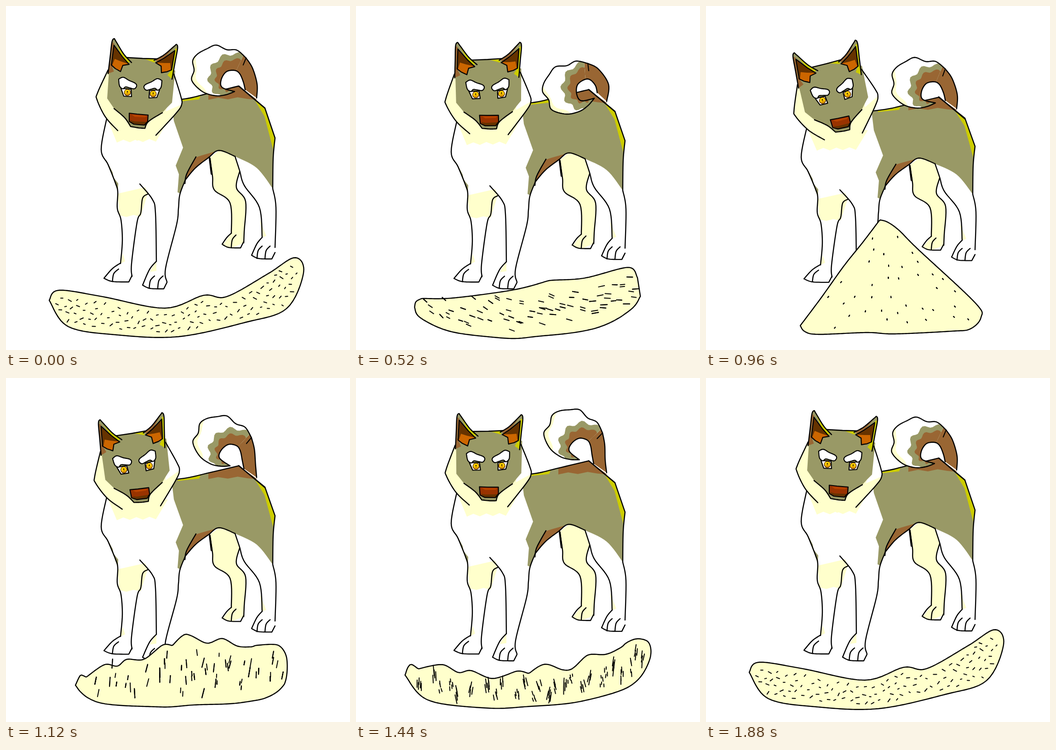
Write an HTML page with a canvas that moves like this. It is 748 px wide and 748 px high and loops after 1.92 s.

```html
<!DOCTYPE html>
<html lang="en">
<head>
<meta charset="utf-8">
<title>Dog</title>
<style>
html, body { margin: 0; width: 100%; height: 100%; overflow: hidden; background: #fff; }
canvas { display: block; width: 748px; height: 748px; }
</style>
</head>
<body>
<canvas id="stage" width="748" height="748"></canvas>
<script>
const ctx = document.getElementById('stage').getContext('2d');
const LOOP = 1920, STEP = 40, RAD = Math.PI / 180;
const OLIVE = '#999966', BROWN = '#996633', CREAM = '#ffffcc', LIME = '#cccc00',
  DARK = '#663300', ORANGE = '#cc6600', RUST = '#993300', GOLD = '#ffcc00', WHITE = '#fff';

const mix = (a, b, k) => a + (b - a) * k;
const clamp = (v, lo = 0, hi = 1) => Math.min(hi, Math.max(lo, v));
const mixPt = (p, q, k) => p.map((v, i) => mix(v, q[i], k));
const mixPts = (a, b, k) => a.map((p, i) => mixPt(p, b[i], k));
const pts = s => s.trim().split(/\s+/).map(p => p.split(',').map(Number));

// Smooth line through the given points.
function spline(r) {
  if (r.length < 3) return r;
  const out = [r[0]];
  for (let i = 0; i < r.length - 1; i++) {
    const a = r[i - 1] || r[i], b = r[i], c = r[i + 1], d = r[i + 2] || c;
    for (let n = 1; n <= 8; n++) {
      const u = n / 8;
      out.push([0, 1].map(j => b[j] + u * (c[j] - a[j]) / 2
        + u * u * (a[j] - 2.5 * b[j] + 2 * c[j] - d[j] / 2)
        + u * u * u * (1.5 * (b[j] - c[j]) + (d[j] - a[j]) / 2)));
    }
  }
  return out;
}

// A slash in the string marks a sharp corner.
function curve(s) {
  let last = null;
  return s.split('/').flatMap(part => {
    const run = pts(part);
    if (last) run.unshift(last);
    last = run[run.length - 1];
    return spline(run);
  });
}

// Zigzag fur edge between two points.
const fur = (a, b, n, depth) => Array.from({ length: n + 1 }, (_, i) => {
  const [x, y] = mixPt(a, b, i / n);
  return [x, y + (i % 2 ? -depth : depth)];
});

function trace(p, closed) {
  ctx.beginPath();
  p.forEach(([x, y]) => ctx.lineTo(x, y));
  if (closed) ctx.closePath();
}
function fill(p, color) { trace(p, true); ctx.fillStyle = color; ctx.fill(); }
function ink(p, w = 2.4, closed = false) { trace(p, closed); ctx.lineWidth = w; ctx.stroke(); }
function disc(x, y, r, color) {
  ctx.beginPath();
  ctx.arc(x, y, r, 0, 7);
  ctx.fillStyle = color;
  ctx.fill();
}

// ---- body ----
const back = curve('360,206 400,200 440,190 506,174 / 563,222 / 585,287 / 581,330 580,397');
const rump = back.slice(-11, -9);
const chest = curve('220,240 207,312 222,345 238,385 243,404 242,440 250,465 253,510 249,560');
const foreInner = curve('274,588 273,560 285,470 293,450 297,418 308,409');
const foreNear = curve('291,387 318,420 325,450 327,555');
const foreBack = curve('350,600 347,570 371,475 375,440 378,410 390,378');
const belly = curve('390,378 412,352 440,330 463,314 498,327');
const hindFront = curve('498,327 508,358 518,390 551,438 557,503');
const hindBack = curve('580,397 587,438 585,525');
const farBack = curve('443,330 449,370 453,400 487,428 490,494');
const farFront = curve('517,515 518,490 521,425 501,395 508,360');
const elbow = curve('413,328 393,365 389,386');
const haunch = curve('498,327 545,352 580,397');
const flank = pts('373,405 376,366 369,347 385,308 365,250');

const patches = [
  [CREAM, [...farBack, [470, 521], [491, 526], ...farFront, ...belly.slice(-9).reverse()]],
  [OLIVE, [...flank, ...back, ...haunch.slice().reverse(), ...belly.slice().reverse(), [379, 408]]],
  [BROWN, [[440, 191], [506, 174], [546, 204], ...fur([525, 200], [440, 202], 4, 2)]],
  [LIME, pts('374,204 400,200 424,193 420,203 374,208')],
  [LIME, pts('540,203 563,222 585,287 582,316 562,240')],
  [BROWN, [...belly.slice(0, -8), ...pts('425,325 413,329 393,365')]],
  [OLIVE, pts('217,333 232,362 234,373 244,386 243,404 236,383')],
  [CREAM, [[218, 240], ...fur([241, 294], [326, 292], 6, 3), [352, 250]]],
  [CREAM, [[243, 408], [303, 394], [308, 408], ...fur([293, 456], [246, 457], 3, 2)]],
  [CREAM, pts('254,538 259,555 249,560')],
  [CREAM, pts('327,555 327,576 312,578')],
  [CREAM, pts('552,465 566,500 557,503')]
];
const lines = [back, chest, foreInner, foreNear, foreBack, belly, hindFront, hindBack, farBack, farFront, elbow];

function paw(x, y, left, base, right, toes) {
  const w = right - left;
  ink([...spline([[x, y], [mix(x, left, .5), mix(y, base, .3)], [left, base - 8]]),
    ...spline([[left, base - 8], [left + w * .3, base - 1], [right - 7, base]]), [right, base - 14]]);
  toes.forEach(k => ink(spline([[left + w * (k + .22), base - 28], [left + w * (k + .05), base - 18], [left + w * k, base - 1]])));
}

function drawBody() {
  patches.forEach(([color, p]) => fill(p, color));
  lines.forEach(p => ink(p));
  ink([[443, 332], [447, 365]], 4);
  paw(249, 559, 213, 600, 274, [.3]);
  paw(327, 555, 297, 615, 350, [.27, .62]);
  paw(557, 503, 534, 550, 585, [.23, .57]);
  paw(490, 494, 470, 526, 517, [.42]);
}

// ---- tail: the curl turns about a joint, the stem follows part of the way ----
const JOINT = [525, 135], HOLE = [490, 163];
const tailEdge = pts('545,200 546,170 536,135 522,113 502,96 480,95 457,85 437,93 417,104 406,119 409,140 404,162 427,186 455,195 478,193 497,186 470,177 468,160 479,143 497,140 508,147 516,165 520,182');
const CORNER = 3, TIP = 15, STEM = 19;

// Wavy arc around the hole, from the corner round to the tip.
function band(r0, r1, ripple) {
  const arc = Array.from({ length: 41 }, (_, i) => {
    const u = i / 40, a = mix(-65, -285, u) * RAD, r = mix(r0, r1, u) + ripple * Math.sin(u * 40);
    return [HOLE[0] + r * Math.cos(a), HOLE[1] + r * Math.sin(a)];
  });
  return [...arc, HOLE];
}
const bands = [[CREAM, band(130, 130, 0)], [WHITE, band(135, 15, 3)], [OLIVE, band(62, 36, 4)], [BROWN, band(50, 18, 3)]];

function drawTail(curl) {
  const turn = -39 * RAD * curl, sway = -10 * curl, c = Math.cos(turn), s = Math.sin(turn);
  const edge = tailEdge.map((p, i) => {
    const x = p[0] - JOINT[0], y = p[1] - JOINT[1];
    const bent = [JOINT[0] + sway + x * c - y * s, JOINT[1] + x * s + y * c];
    return mixPt(p, bent, i < CORNER || i > STEM ? clamp((200 - p[1]) / 65) : 1);
  });
  const outline = [...spline(edge.slice(0, CORNER + 1)), ...spline(edge.slice(CORNER, TIP + 1)), ...spline(edge.slice(TIP))];
  ctx.save();
  trace(outline, true);
  ctx.clip();
  fill(outline, BROWN);
  ctx.translate(JOINT[0] + sway, JOINT[1]);
  ctx.rotate(turn);
  ctx.translate(-JOINT[0], -JOINT[1]);
  bands.forEach(([color, p]) => fill(p, color));
  ctx.restore();
  ink(outline);
  ink([edge[CORNER], mixPt(edge[CORNER], edge[STEM + 1], .45)], 2);
  ink([[506, 174], [563, 222]]);
}

// ---- head ----
const maneLeft = curve('222,138 199,188 198,203 216,240 243,270');
const maneRight = curve('365,147 380,195 382,213 370,232 326,280');
const jaw = curve('235,222 258,242 271,261 / 288,264 302,265 / 310,250 340,231');
const face = [[224, 140], [220, 200], ...jaw, ...pts('350,220 361,209 368,140 330,114 297,112 262,112')];
const nose = pts('268,232 285,234 309,236 308,250 301,258 278,256 268,250');
const brow = spline(pts('-19,-9 -9,-13 4,-6 17,0 20,6 15,12 5,10 -4,8 -10,12 -17,6 -19,-9'));
const lid = pts('-14,-9 8,-7 9,9 -8,8');

// Ear shapes in fractions of the way from the outer foot to the inner foot and to the tip.
const earShape = spline(pts('0,0 0,.5 0,.93 .08,1 .17,.9 .6,.38 1,0'));
const earOuter = pts('0,0 0,.5 0,.93 .11,.85 .06,.3 .25,-.02');
const earInner = pts('.15,.92 .6,.38 .95,.06 .85,.04 .5,.38');
const earHollow = pts('.11,.8 .55,.32 .9,-.02 .62,.04 .55,-.12 .42,-.03 .3,.05 .1,.22');
const earGlow = pts('.22,.36 .5,.2 .88,0 .62,.04 .55,-.11 .42,-.03 .3,.05 .14,.2');

function ear(foot, inner, tip, outerColor, innerColor) {
  const fit = p => p.map(([u, v]) => foot.map((f, j) => f + u * (inner[j] - f) + v * (tip[j] - f)));
  fill(fit(earShape), OLIVE);
  fill(fit(earOuter), outerColor);
  fill(fit(earInner), innerColor);
  fill(fit(earHollow), DARK);
  fill(fit(earGlow), ORANGE);
  ink(fit(earHollow), 2.2, true);
  ink(fit(earShape));
}

function eye(x, y, side) {
  const at = (p, dy) => p.map(([a, b]) => [x + side * a, y + b + dy]);
  ctx.save();
  fill(at(lid, 0), WHITE);
  trace(at(lid, 0), true);
  ctx.clip();
  disc(x, y, 7.5, DARK);
  disc(x, y - .5, 6, GOLD);
  disc(x, y + 3, 3, '#dd9900');
  disc(x, y - 1.5, 1.3, '#000');
  ctx.restore();
  ink(at(lid, 0), 2.2, true);
  fill(at(brow, -20), WHITE);
  ink(at(brow, -20), 2.2, true);
}

function drawHead(lean) {
  ctx.save();
  ctx.translate(288 + 5.2 * lean, 245 + 8.3 * lean);
  ctx.rotate(-17.7 * lean * RAD);
  ctx.translate(-288, -244);
  fill([...maneLeft, [285, 292], ...maneRight.slice().reverse()], CREAM);
  fill([...maneRight.slice(0, 17), [348, 228]], WHITE);
  fill(face, OLIVE);
  fill(pts('297,112 330,114 322,122'), LIME);
  [maneLeft, maneRight, jaw, [[262, 111], [297, 113], [330, 114]]].forEach(p => ink(p));
  ear([222, 146], [273, 122], [231, 72], BROWN, LIME);
  ear([361, 158], [322, 117], [374, 86], LIME, BROWN);
  fill(nose, RUST);
  fill(pts('269,247 280,250 306,251 300,258 278,256'), DARK);
  fill(pts('273,235 306,238 303,241 280,240'), '#b84300');
  ink(nose, 2.2, true);
  eye(264, 187, 1);
  eye(320, 190, -1);
  ctx.restore();
}

// ---- ground ----
function resample(p, n) {
  const d = [0];
  for (let i = 1; i < p.length; i++) d.push(d[i - 1] + Math.hypot(p[i][0] - p[i - 1][0], p[i][1] - p[i - 1][1]));
  return Array.from({ length: n }, (_, k) => {
    const s = d[d.length - 1] * k / (n - 1);
    const i = Math.max(1, d.findIndex(v => v >= s - 1e-6));
    return mixPt(p[i - 1], p[i], (s - d[i - 1]) / (d[i] - d[i - 1] || 1));
  });
}

let seed = 11;
const rnd = () => (seed = seed * 16807 % 2147483647) / 2147483647;
const stroke = (a, half) => [Math.cos(a) * half, Math.sin(a) * half];

// Marks scattered evenly inside a shape; aim gives half of each stroke.
function scatter(shape, count, gap, aim) {
  const list = [];
  trace(shape, true);
  for (let tries = 0; list.length < count && tries < 20000; tries++) {
    const x = 95 + rnd() * 550, y = 465 + rnd() * 255;
    const inside = [[-12, 0], [12, 0], [0, -12], [0, 12]].every(([a, b]) => ctx.isPointInPath(x + a, y + b));
    if (inside && list.every(m => Math.hypot(m[0] - x, m[1] - y) > gap)) list.push([x, y, ...aim(x)]);
  }
  return list.sort((a, b) => a[0] - b[0]);
}

function scene(outline, count, gap, aim) {
  const shape = resample(curve(outline), 300);
  return { shape, marks: scatter(shape, count, gap, aim) };
}

const scenes = {
  bar: scene('94,640 115,618 210,632 345,657 430,629 480,632 570,582 628,547 647,580 610,658 520,688 375,719 240,715 135,697 94,640',
    112, 13, () => stroke((rnd() - .65) * 1.7, 1.5 + rnd() * 2.5)),
  log: scene('108,645 110,632 124,626 / 200,638 340,641 430,630 510,614 612,568 633,590 / 634,635 / 600,665 490,705 380,720 310,725 190,708 120,670 108,645',
    52, 19, x => stroke((330 - x) / 700 + (rnd() - .5) * .5, 5 + rnd() * 3)),
  mound: scene('205,695 250,635 300,565 340,515 378,465 / 395,470 420,488 460,528 585,645 598,677 575,702 535,707 410,713 350,710 245,714 215,708 205,695',
    37, 22, x => stroke(Math.PI / 2 - clamp((x - 388) / -130, -.75, .7) * -1, 9)),
  ridge: scene('115,650 125,625 138,642 / 188,620 220,644 246,632 290,654 340,626 365,641 / 398,618 450,638 485,601 525,613 560,602 575,589 627,568 642,605 600,672 500,705 390,710 300,718 170,702 115,650',
    26, 24, () => stroke(1.6 + (rnd() - .4) * .5, 4 + rnd() * 13))
};
const plan = [[0, 'bar'], [80, 'bar'], [280, 'log'], [480, 'log'], [680, 'mound'],
  [1000, 'mound'], [1200, 'ridge'], [1360, 'ridge'], [1560, 'bar'], [LOOP, 'bar']];
const MARKS = 112;

// Every scene gives the same number of marks, so that they can blend.
function spread(name, t) {
  const list = scenes[name].marks;
  const k = name === 'mound' ? mix(1, .15, clamp((t - 680) / 280)) : 1;
  return Array.from({ length: MARKS }, (_, i) => {
    const [x, y, dx, dy] = list[Math.floor(i * list.length / MARKS)];
    return [x, y, dx * k, dy * k];
  });
}

function drawGround(t) {
  const i = plan.findIndex(([at], n) => n && t < at);
  const [t0, a] = plan[i - 1], [t1, b] = plan[i];
  const k = (t - t0) / (t1 - t0);
  const shape = mixPts(scenes[a].shape, scenes[b].shape, k);
  fill(shape, CREAM);
  ink(shape, 2.4, true);
  mixPts(spread(a, t), spread(b, t), k)
    .forEach(([x, y, dx, dy]) => ink([[x - dx, y - dy], [x + dx, y + dy]], 2));
}

function draw(t) {
  const lean = t < 940 ? (t / 940) ** 2 : ((LOOP - t) / 980) ** 2;
  const curl = t < 640 ? 1.14 * (t / 640) ** 2
    : t < 1280 ? mix(1.14, -1, (t - 640) / 640)
    : -(((LOOP - t) / 640) ** 2);
  ctx.fillStyle = WHITE;
  ctx.fillRect(0, 0, 748, 748);
  ctx.strokeStyle = '#000';
  ctx.lineCap = ctx.lineJoin = 'round';

  // The body sinks towards the paws; the tail rides on the back.
  ctx.save();
  ctx.translate(0, 615);
  ctx.scale(1, 1 - .0577 * lean);
  ctx.translate(0, -615);
  drawBody();
  ctx.restore();
  ctx.save();
  ctx.translate(0, 24.5 * lean);
  drawTail(curl);
  ctx.restore();
  drawHead(lean);
  drawGround(t);
}

const start = performance.now();
function tick() {
  const t = (performance.now() - start) % LOOP;
  draw(Math.floor(t / STEP) * STEP);
  requestAnimationFrame(tick);
}
tick();
</script>
</body>
</html>
```
